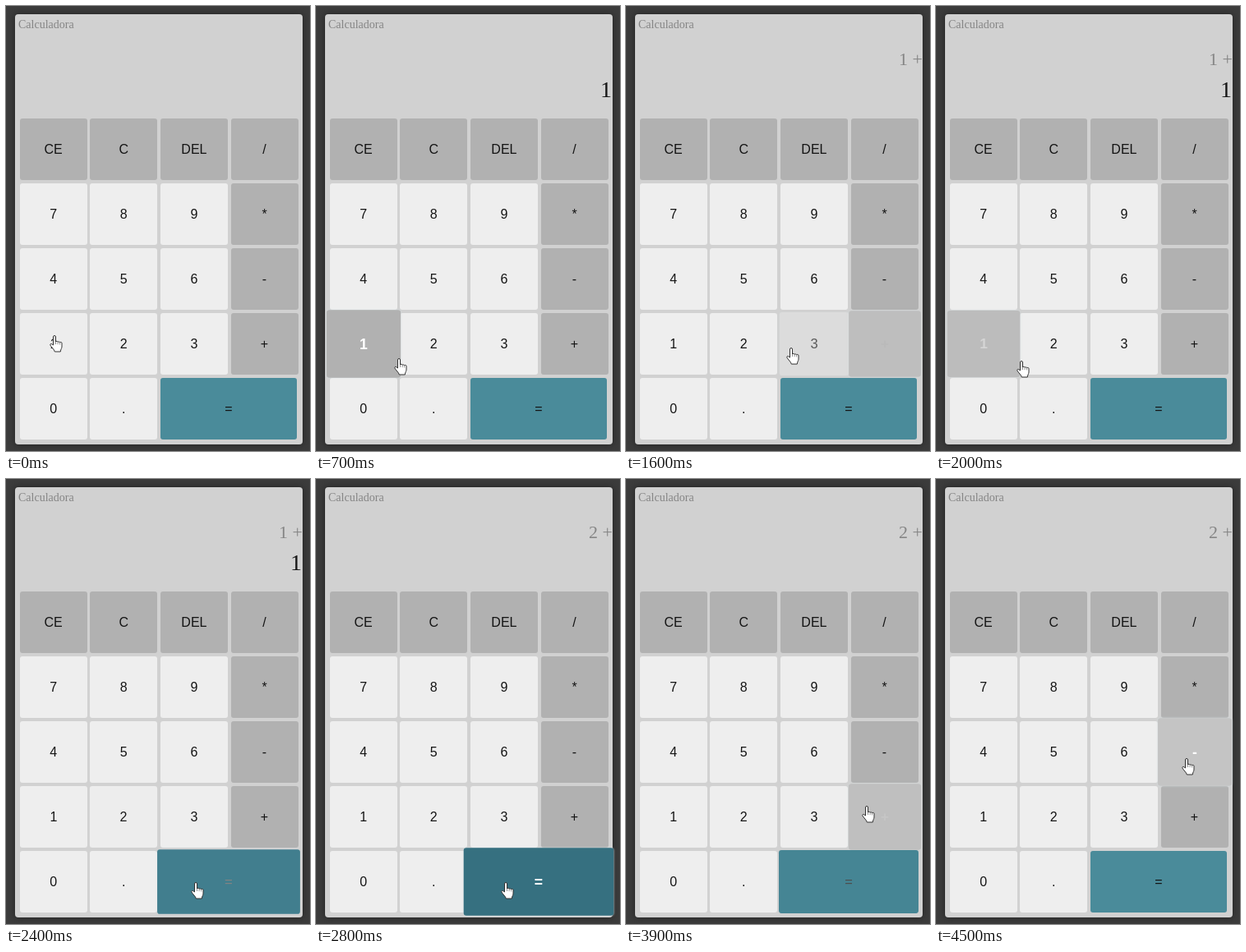
An HTML page that plays this animation: 370 by 542 pixels, repeating every 5 s.

```html
<!DOCTYPE html>
<html lang="pt">
<head>
<meta charset="utf-8">
<title>Calculadora</title>
<style>
  html, body { margin: 0; width: 100%; height: 100%; overflow: hidden; background: #3c3c3c; }
  div, svg { position: absolute; }
  #panel {
    left: 11px; top: 10px; width: 350px; height: 524px;
    background: #d1d1d1; border-radius: 4px; box-shadow: 0 0 8px #222;
  }
  #title, #expr, #result { font-family: "Liberation Serif", "Times New Roman", serif; white-space: pre; line-height: 1; }
  #title { left: 15px; top: 16px; font-size: 14px; color: #858585; }
  #expr { right: 9px; top: 54px; font-size: 22px; color: #858585; }
  #result { right: 10px; top: 88px; font-size: 28px; color: #151515; }
  #stage { left: 0; top: 0; width: 370px; height: 542px; overflow: hidden; }
  .key {
    height: 75px; line-height: 75px; border-radius: 3px; text-align: center;
    font-family: "Liberation Sans", Arial, sans-serif; font-size: 16px;
  }
  #hand { left: 0; top: 0; z-index: 3; overflow: visible; }
</style>
</head>
<body>
<div id="stage">
  <div id="panel"></div>
  <div id="title">Calculadora</div>
  <div id="expr"></div>
  <div id="result"></div>
  <svg id="hand" width="16" height="21">
    <path fill="#fff" stroke="#333" stroke-width="1" stroke-linejoin="round"
      d="M4.5 12V2a1.5 1.5 0 0 1 3 0V8a1.4 1.4 0 0 1 2.6.4 1.4 1.4 0 0 1 2.5.6 1.3 1.3 0 0 1 2.4.8V14c0 2-1.5 3-1.7 6H6.3C6 17.5 2 14.5.9 12c-.5-1.3 1-2.2 2-1.2z"/>
    <path fill="none" stroke="#777" stroke-width=".8" d="M7.5 8v3M10.1 8.6v2.6M12.6 9.2v2.2"/>
  </svg>
</div>
<script>
const LOOP = 5000, STEP = 100, LAST = 4500, FADE = 500;
const $ = id => document.getElementById(id);

// Base and hover colours per kind of key
const tones = {
  num: [[238, 238, 238], [177, 177, 177]],
  op: [[177, 177, 177], [196, 196, 196]],
  eq: [[74, 139, 154], [54, 112, 128]]
};

// Time under the pointer: [from, to]
const hovers = {
  '1': [[-10, 700], [1740, 2000]],
  '2': [[700, 800], [1600, 1740], [2010, 2180]],
  '3': [[800, 910], [1500, 1600]],
  '+': [[910, 1500], [3670, 4000]],
  '.': [[2180, 2260]],
  '=': [[2260, 3670]],
  '-': [[4000, 6000]]
};

// Pointer tip: [time, x, y]
const path = [
  [0, 58, 402], [300, 58, 408], [600, 66, 428], [700, 100, 430], [910, 272, 425],
  [1050, 325, 412], [1200, 327, 410], [1400, 327, 410], [1500, 270, 415],
  [1740, 102, 420], [1850, 80, 425], [2000, 103, 433], [2180, 160, 452],
  [2260, 188, 475], [2400, 230, 492], [3400, 230, 492], [3670, 285, 449],
  [3900, 292, 399], [4000, 298, 374], [4300, 304, 341], [5000, 304, 341]
];

// Display contents: [time, expression, result]
const display = [
  [0, '', ''], [300, '', '1'], [1400, '1 +', ''], [1900, '1 +', '1'], [2600, '2 +', '']
];

const rows = [['CE', 'C', 'DEL', '/'], '789*', '456-', '123+', '0.='];
const keys = rows.flatMap((row, r) => [...row].map((label, c) => {
  const el = document.createElement('div');
  const kind = label === '=' ? 'eq' : /[\d.]/.test(label) ? 'num' : 'op';
  el.className = 'key';
  el.textContent = label;
  el.style.left = 16.7 + 85.6 * c + 'px';
  el.style.top = 137 + 79 * r + 'px';
  el.style.width = (kind === 'eq' ? 166 : 82) + 'px';
  $('stage').insertBefore(el, $('hand'));
  return { el, kind, spans: hovers[label] || [] };
}));

const mix = (a, b, p) => a + (b - a) * p;
const rgb = (a, b, p) => `rgb(${a.map((v, i) => Math.round(mix(v, b[i], p)))})`;

// CSS "ease": cubic-bezier(.25, .1, .25, 1)
function ease(x) {
  if (x <= 0) return 0;
  if (x >= 1) return 1;
  let lo = 0, hi = 1;
  for (let i = 0; i < 20; i++) {
    const s = (lo + hi) / 2;
    if (.75 * s * (1 - s) + s ** 3 < x) lo = s; else hi = s;
  }
  return .3 * lo * (1 - lo) ** 2 + 3 * lo * lo * (1 - lo) + lo ** 3;
}

function hoverLevel(spans, t) {
  return Math.max(0, ...spans.map(([from, to]) => {
    const peak = ease((Math.min(t, to) - from) / FADE);
    return t > to ? peak * (1 - ease((t - to) / (FADE * peak))) : peak;
  }));
}

function draw(t) {
  for (const { el, kind, spans } of keys) {
    const p = hoverLevel(spans, t), s = el.style;
    s.background = rgb(...tones[kind], p);
    s.color = rgb([20, 20, 20], [255, 255, 255], p);
    s.fontWeight = p > .6 ? 700 : 400;
    s.transform = p ? `scale(${1 + .1 * p})` : 'none';
    s.boxShadow = p ? `0 0 2px rgba(215,225,228,${p})` : 'none';
    s.zIndex = p ? 2 : 1;
  }

  const i = path.findIndex(k => k[0] > t);
  const [a, b] = [path[i - 1], path[i]];
  const p = (t - a[0]) / (b[0] - a[0]);
  $('hand').style.transform = `translate(${mix(a[1], b[1], p) - 5}px,${mix(a[2], b[2], p) - 1}px)`;

  const [, expr, result] = display.filter(d => d[0] <= t).pop();
  $('expr').textContent = expr;
  $('result').textContent = result;
}

const start = performance.now();
function tick() {
  const t = (performance.now() - start) % LOOP;
  draw(Math.min(LAST, Math.floor(t / STEP) * STEP));
  requestAnimationFrame(tick);
}
tick();
</script>
</body>
</html>
```
